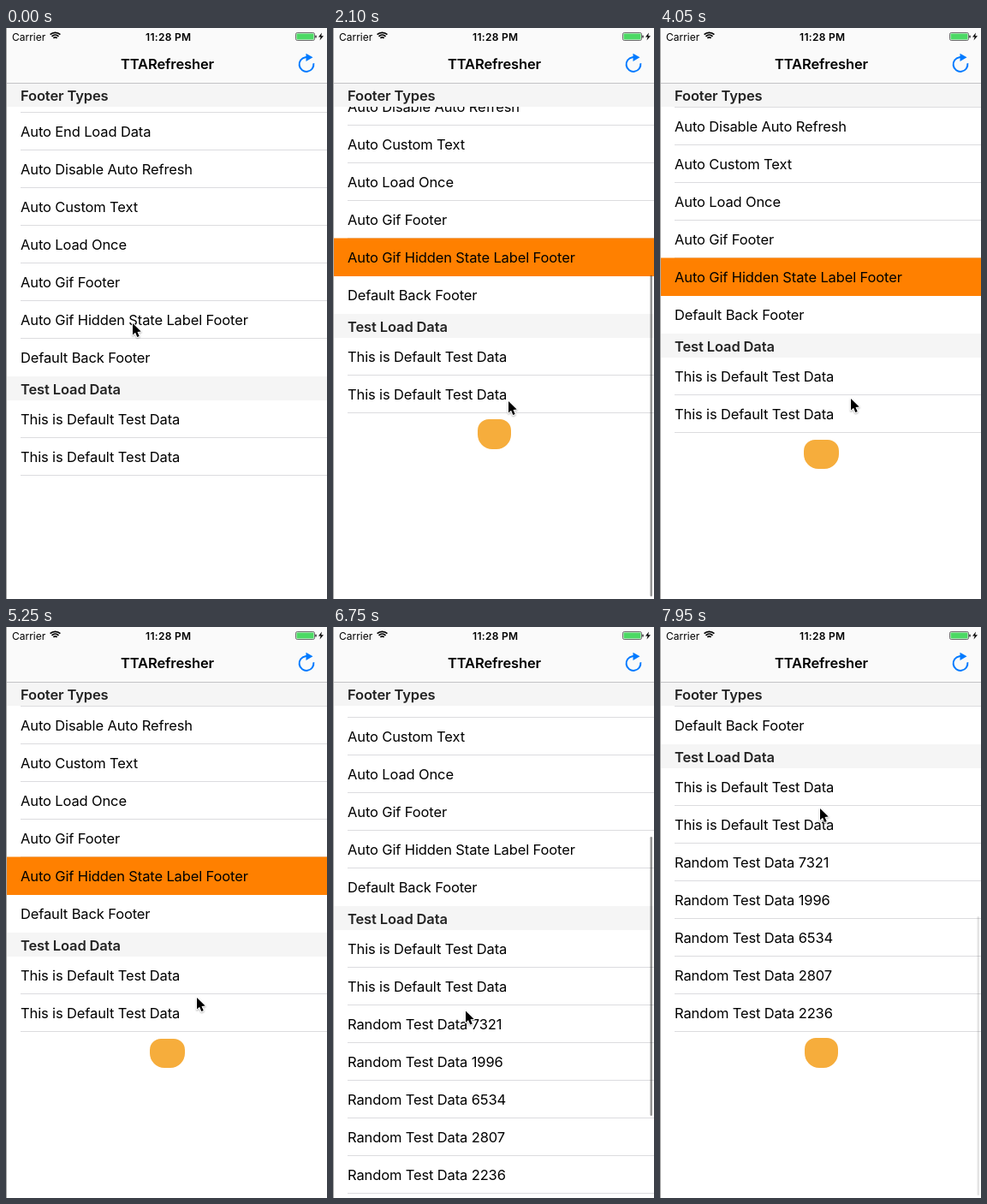
Recreate the animation shown at these times as an HTML page with a canvas. Size 375x667 px, loop 8000 ms.

```html
<!DOCTYPE html>
<html lang="en">
<head>
<meta charset="utf-8">
<title>Refresh list</title>
<style>
html, body { margin: 0; width: 100%; height: 100%; overflow: hidden; background: #fff; }
canvas { display: block; width: 375px; height: 667px; }
</style>
</head>
<body>
<canvas id="stage"></canvas>
<script>
const W = 375, H = 667, LOOP = 8000, STEP = 150;
const ROW = 44, HEAD = 28, NAV = 64;
const FONT = 'Inter, Roboto, sans-serif';
const LINE = '#dcdcdf', BLUE = '#007aff';

// Moments of the story, in ms
const TAP = 450, PULL = 1500, TOP = 2100, RELEASE = 2250, REST = 2850;
const LOADED = 5400, AIMED = 5700, FLICK = 6325, PEAK = 7200, END = 7950;

const canvas = document.getElementById('stage');
const ctx = canvas.getContext('2d');
const ratio = window.devicePixelRatio || 1;
canvas.width = W * ratio;
canvas.height = H * ratio;

const types = ['Auto End Load Data', 'Auto Disable Auto Refresh', 'Auto Custom Text',
  'Auto Load Once', 'Auto Gif Footer', 'Auto Gif Hidden State Label Footer',
  'Default Back Footer'];
const chosen = 5;
const defaults = Array(2).fill('This is Default Test Data');
const randoms = [7321, 1996, 6534, 2807, 2236].map(n => 'Random Test Data ' + n);

const linear = p => p;
const smooth = p => p * p * (3 - 2 * p);
const easeIn = p => p ** 3;
const easeOut = p => 1 - (1 - p) ** 3;
const sineOut = p => Math.sin(p * Math.PI / 2);

// Progress from 0 to 1 between two moments
const phase = (t, from, to, ease = linear) =>
  ease(Math.min(1, Math.max(0, (t - from) / (to - from))));

// Pull, spring back to the footer, flick, spring back again
function scrollAt(t) {
  return 73 * phase(t, PULL, TOP, sineOut) - 23 * phase(t, RELEASE, REST, easeOut)
    + 270 * phase(t, FLICK, PEAK, easeIn) - 50 * phase(t, PEAK, END, easeOut);
}

function cursorAt(t) {
  const down = phase(t, 750, PULL, smooth);
  const pull = phase(t, PULL, TOP, sineOut);
  const drift = phase(t, RELEASE, REST + 300);
  const aim = phase(t, LOADED, AIMED);
  return [
    148 + 72 * down - 15 * pull + 18 * drift - 68 * aim + 32 * phase(t, 6750, PEAK),
    345 + 176 * down - 85 * pull - 3 * drift + 46 * aim - 267 * phase(t, FLICK, PEAK, easeIn)
  ];
}

function rect(x, y, w, h, color) {
  ctx.fillStyle = color;
  ctx.fillRect(x, y, w, h);
}

function text(str, x, y, { size = 16.5, weight = 400, color = '#000', spacing = -0.13, align = 'left' } = {}) {
  ctx.font = `${weight} ${size}px ${FONT}`;
  ctx.letterSpacing = spacing + 'px';
  ctx.textAlign = align;
  ctx.fillStyle = color;
  ctx.fillText(str, x, y);
}

function trace(points) {
  ctx.beginPath();
  points.forEach(([x, y]) => ctx.lineTo(x, y));
  ctx.closePath();
}

function polygon(points, color) {
  trace(points);
  ctx.fillStyle = color;
  ctx.fill();
}

function round(x, y, w, h, r, color) {
  ctx.beginPath();
  ctx.roundRect(x, y, w, h, r);
  ctx.fillStyle = color;
  ctx.fill();
}

function arc(x, y, r, from, to, width, color) {
  ctx.beginPath();
  ctx.arc(x, y, r, from, to);
  ctx.lineWidth = width;
  ctx.strokeStyle = color;
  ctx.stroke();
}

function separator(y) {
  rect(17, y, W - 17, 1, LINE);
}

function header(label, y) {
  rect(0, y, W, HEAD, '#f5f5f5');
  text(label, 17, y + 21, { weight: 600, color: '#232323' });
}

function footer(t, y) {
  const loading = t >= RELEASE && t < LOADED;
  const wide = loading && (t / STEP) % 2 === 1;
  const w = wide ? 41 : 39, h = wide ? 34 : 35;
  round(188.5 - w / 2, y + 35 - h, w, h, [13, 13, 17, 17], '#f6ad3c');
}

function list(t, offset) {
  const marked = t >= TAP && t < LOADED;
  let y = 99 - offset;
  separator(y - 1);
  types.forEach((label, i) => {
    const lit = marked && i === chosen;
    if (lit) rect(0, y - 0.5, W, ROW + 0.5, '#ff8000');
    else if (i < types.length - 1) separator(y + ROW - 1);
    text(label, 17, y + 28);
    y += ROW;
  });
  const second = y;
  header('Test Load Data', y);
  y += HEAD;
  for (const label of t < LOADED ? defaults : defaults.concat(randoms)) {
    text(label, 17, y + 28);
    y += ROW;
    separator(y - 1);
  }
  if (t > PULL) footer(t, y + 7);
  header('Footer Types', Math.min(NAV, second - HEAD));
}

function scrollBar(t, offset) {
  const alpha = phase(t, PULL, PULL + STEP) - phase(t, REST, REST + 450)
    + phase(t, 6300, 6450) - phase(t, 7650, 8050);
  if (alpha <= 0) return;
  const [rest, length, rate] = t < LOADED ? [50, 398, 0.65] : [270, 326, 0.492];
  const gap = rest - offset;
  const bottom = 664 - Math.max(0, gap) * rate;
  const size = length - Math.max(0, -gap);
  round(370.5, bottom - size, 2.5, size, 1.25, `rgba(0,0,0,${0.42 * alpha})`);
}

function statusBar() {
  text('Carrier', 7, 14.5, { size: 12, spacing: 0 });
  for (const r of [3, 5.8, 8.6]) arc(57.5, 14, r, -Math.PI * 0.74, -Math.PI * 0.26, 1.7, '#000');
  text('11:28 PM', 189.7, 14.5, { size: 12, weight: 600, spacing: 0.3, align: 'center' });
  ctx.beginPath();
  ctx.roundRect(338.5, 5.5, 22, 9, 1.8);
  ctx.lineWidth = 0.7;
  ctx.strokeStyle = '#333';
  ctx.stroke();
  round(339.5, 6.5, 20, 7, 0.8, '#4cd964');
  round(361.3, 8.5, 1.4, 3.2, 0.7, '#333');
  polygon([[369, 5.5], [365, 10.6], [367.7, 10.6], [366.5, 14.5], [371, 9.2], [368.2, 9.2]], '#000');
}

function navBar() {
  rect(0, 0, W, NAV, '#fafafa');
  rect(0, NAV, W, 1, '#c4c4c6');
  statusBar();
  text('TTARefresher', 188.5, 48, { weight: 600, align: 'center' });
  arc(351, 42.5, 8.4, -0.15, Math.PI * 1.5, 2, BLUE);
  polygon([[350.5, 29.8], [358.5, 34.3], [350.5, 39]], BLUE);
}

function cursor([x, y]) {
  ctx.save();
  ctx.translate(x, y);
  trace([[0, 0], [0, 13.6], [3.1, 10.8], [5.3, 16], [7.7, 15], [5.5, 9.9], [9.7, 9.6]]);
  ctx.shadowColor = 'rgba(0,0,0,.3)';
  ctx.shadowBlur = 2 * ratio;
  ctx.shadowOffsetY = ratio;
  ctx.lineWidth = 2;
  ctx.lineJoin = 'round';
  ctx.strokeStyle = '#fff';
  ctx.stroke();
  ctx.shadowColor = 'transparent';
  ctx.fillStyle = '#000';
  ctx.fill();
  ctx.restore();
}

function draw(now) {
  const t = Math.floor((now % LOOP) / STEP) * STEP;
  const offset = Math.round(scrollAt(t));
  ctx.setTransform(ratio, 0, 0, ratio, 0, 0);
  rect(0, 0, W, H, '#fff');
  list(t, offset);
  scrollBar(t, offset);
  navBar();
  rect(0, 0, 1, H, '#a8a8a8');
  cursor(cursorAt(t));
}

const start = performance.now();
function tick() {
  draw(performance.now() - start);
  requestAnimationFrame(tick);
}
tick();
</script>
</body>
</html>
```
